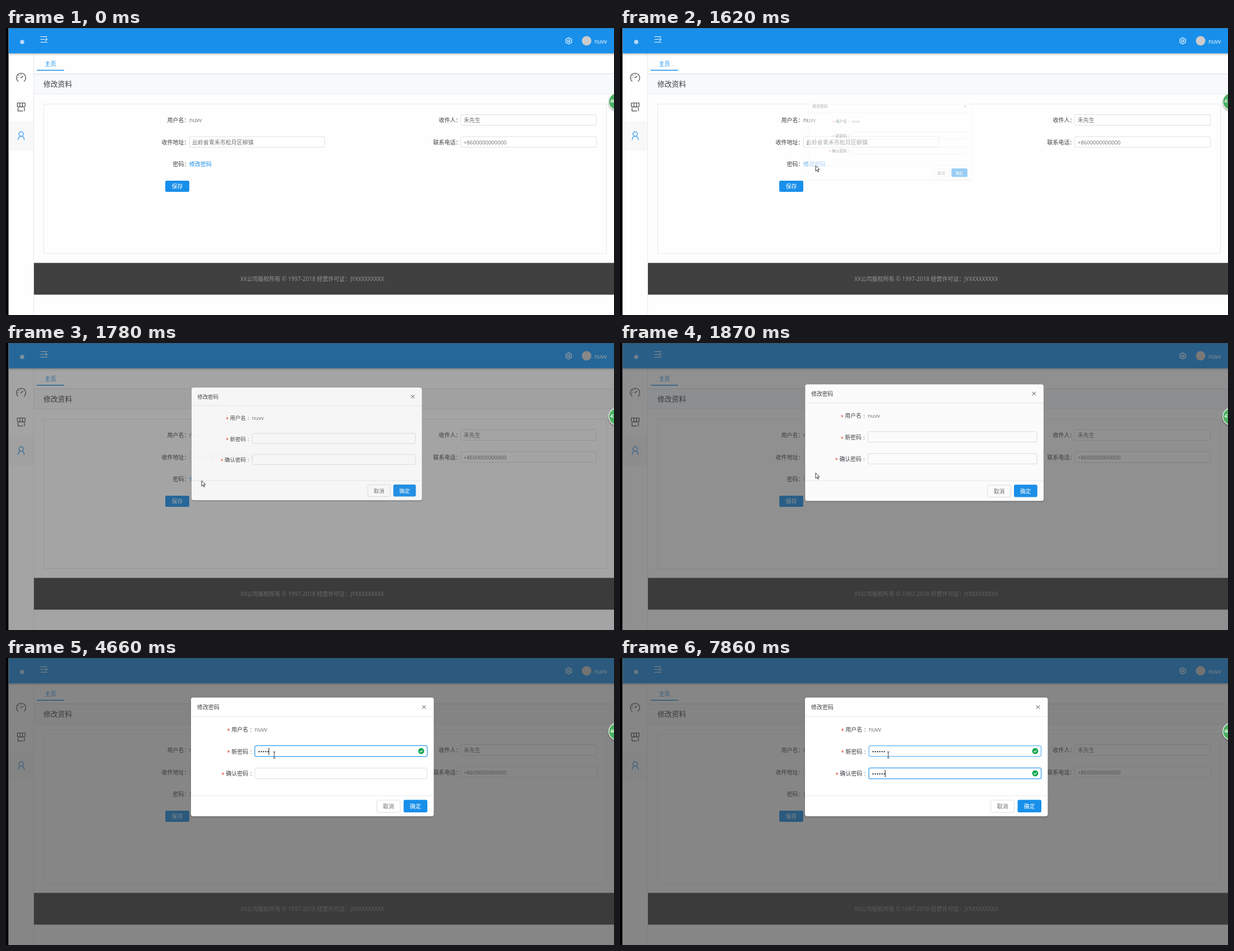
An HTML page for the animation above (8000 ms loop, 1088x515 px).

```html
<!DOCTYPE html>
<html lang="zh-CN">
<head>
<meta charset="utf-8">
<title>修改资料</title>
<style>
html, body { margin: 0; width: 100%; height: 100%; overflow: hidden; background: #fefefe; }
svg { display: block; width: 100%; height: 100%; }
text { font: 10px 'Open Sans', 'Noto Sans CJK SC', 'Noto Sans CJK', sans-serif; fill: #3c3f44; white-space: pre; }
.value { fill: #6c6c6c; }
.phone { font-size: 9.6px; fill: #6c6c6c; }
.title { font-size: 12.8px; }
.link { fill: #188fea; }
.white { fill: #fff; }
.mid { text-anchor: middle; }
.star { fill: #e0402a; }
.footer { fill: #999; text-anchor: middle; }
.count { font: bold 8.5px 'Liberation Sans', sans-serif; fill: #fff; }
.icon { fill: none; stroke: #444; stroke-width: 1.2; stroke-linecap: round; stroke-linejoin: round; }
.blue { stroke: #188fea; }
.pale { stroke: #fff; }
.box { fill: #fff; stroke: #dcdee2; }
.line { stroke: #e6e9ec; }
</style>
</head>
<body>
<svg id="stage" viewBox="0 0 1088 515"></svg>
<script>
const stage = document.getElementById('stage');
const USER = 'nuvv';
const BLUE = '#188fea';

// Text is placed by its left edge (or middle) and its vertical centre.
const text = (x, y, str, cls = '', id = '') =>
  `<text x="${x}" y="${y + 3.8}" class="${cls}" id="${id}">${str}</text>`;
const rect = (x, y, w, h, fill, rx = 0) =>
  `<rect x="${x}" y="${y}" width="${w}" height="${h}" rx="${rx}" fill="${fill}"/>`;
const box = (x, y, w, h, rx = 2.5) =>
  `<rect class="box" x="${x}" y="${y}" width="${w}" height="${h}" rx="${rx}"/>`;
const icon = (d, cls = '') => `<path class="icon ${cls}" d="${d}"/>`;
const line = (x1, x2, y) => `<path class="line" d="M${x1} ${y}H${x2}"/>`;

const label = (x, y, str) =>
  text(x - 8, y + 1.5, '*', 'star') + text(x, y, str) + text(437, y, ':');

const passwordField = (id, y) => `
  <rect id="${id}Glow" x="444" y="${y - 11}" width="311" height="22" rx="3.5" fill="${BLUE}"/>
  ${box(445.5, y - 9.5, 308, 19)}
  <rect id="${id}Edge" x="445.5" y="${y - 9.5}" width="308" height="19" rx="2.5" fill="none" stroke="#3fa3ee"/>
  <g id="${id}Dots">${[...Array(6).keys()].map(i =>
    `<circle cx="${452.8 + 4 * i}" cy="${y + 1}" r="1.25" fill="#444"/>`).join('')}</g>
  <path id="${id}Caret" d="M0 ${y - 6}v13" stroke="#222"/>
  <g id="${id}Check">
    <circle cx="743" cy="${y}" r="5.4" fill="#08a650"/>
    <path d="M740.5 ${y}l1.9 1.9 3.3-3.4" fill="none" stroke="#fff" stroke-width="1.2"/>
  </g>`;

const page = `
  <defs><linearGradient id="shade" x2="0" y2="1">
    <stop stop-color="#000" stop-opacity=".22"/><stop offset="1" stop-color="#000" stop-opacity="0"/>
  </linearGradient></defs>
  ${rect(0, 0, 1088, 515, '#fefefe')}
  ${rect(5, 167, 45, 53, '#f8f8f9')}
  <path class="line" d="M49.5 46V515"/>
  ${rect(50, 83, 1038, 35, '#f8f9fb')}
  <path d="M50 82.5H1088" stroke="#d6dee5"/>
  ${line(50, 1088, 118.5)}
  ${rect(5, 45, 1083, 5, 'url(#shade)')}
  ${rect(5, 0, 1083, 45.5, BLUE)}
  ${rect(5, 0, 1083, 1, '#3a78ac')}
  <circle cx="29" cy="25" r="3.8" fill="#b5d9f7"/>
  ${icon('M62 15.5h11.5M62 20.5h8M62 25.5h11.5M71 18.3l2.6 2.2-2.6 2.2', 'pale')}
  ${icon('M1007 17.3l5 2.9v5.7l-5 2.9-5-2.9v-5.7z', 'pale')}
  <circle class="icon pale" cx="1007" cy="23" r="2"/>
  <circle cx="1039" cy="23" r="8.5" fill="#cbcbcb"/>
  ${text(1053, 24, USER, 'white')}
  ${icon('M21.5 95.5A8.3 8.3 0 1 1 32.5 95.5M26.5 89.5l4-3M21 89h1M27 82.5v1M23 85l.5.5')}
  ${icon('M20.3 134.5h13.8v5a2.3 2.3 0 0 1-4.6 0 2.3 2.3 0 0 1-4.6 0 2.3 2.3 0 0 1-4.6 0zM24.9 134.5v5M29.5 134.5v5M21.5 143.5v5.3h8.5M33 143.5v5.3')}
  ${icon('M31.2 190.2a4 4 0 1 1-8 0 4 4 0 1 1 8 0M21.8 200.3c.3-4 2.4-6.1 5.4-6.1s5.1 2.1 5.4 6.1', 'blue')}
  ${text(69.5, 64.5, '主页', 'link')}
  ${rect(55, 75, 49, 1.5, BLUE)}
  ${text(67, 101.5, '修改资料', 'title')}
  <rect x="67.5" y="136.5" width="1007" height="268" fill="none" class="line"/>
  ${text(288.5, 165.5, '用户名：')}${text(328, 165.5, USER, 'value')}
  ${text(278.5, 205, '收件地址：')}${box(328.5, 195, 242, 19)}
  ${text(333, 205, '云岭省青禾市松月区柳镇', 'value')}
  ${text(298.5, 244.5, '密码：')}${text(328, 244.5, '修改密码', 'link', 'link')}
  ${text(774.5, 165.5, '收件人：')}${box(813.5, 155.5, 243, 19)}
  ${text(819, 165.5, '禾先生', 'value')}
  ${text(764.5, 205, '联系电话：')}${box(813.5, 195, 243, 19)}
  ${text(819, 205, '+8600000000000', 'phone')}
  ${rect(285, 274, 43, 20, BLUE, 2.5)}${text(306.5, 284.3, '保存', 'white mid')}
  ${rect(50, 421.5, 1038, 57, '#404040')}
  ${text(548, 450, 'XX公司版权所有 © 1997-2018 经营许可证：JYXXXXXXXXX', 'footer')}`;

const modal = `
  <rect id="mask" x="4.5" y="0" width="1084" height="515" fill="#373737"/>
  <g id="modal">
    ${rect(330, 72, 436.5, 214.5, 'rgba(0,0,0,.12)', 5)}
    ${rect(331, 71, 434.5, 213, '#fff', 4)}
    ${line(331, 765.5, 105)}${line(331, 765.5, 247)}
    ${text(342, 88, '修改密码')}
    <path d="M744.8 84.8l6.4 6.4m0-6.4l-6.4 6.4" stroke="#777" stroke-width="1.1"/>
    ${label(403.5, 128.5, '用户名')}${text(445, 128.5, USER, 'value')}
    ${label(403.5, 168, '新密码')}${passwordField('first', 167)}
    ${label(393.5, 207.5, '确认密码')}${passwordField('second', 207)}
    ${box(663.5, 255, 42, 22)}${text(684.5, 266.3, '取消', 'value mid')}
    ${rect(711.5, 254.5, 42.5, 22.5, BLUE, 2.5)}${text(732.7, 266.3, '确定', 'white mid')}
  </g>`;

const overlay = `
  ${rect(0, 0, 4.5, 515, '#000')}
  <circle cx="1094" cy="134" r="17" fill="#000" opacity=".18"/>
  <circle cx="1094" cy="132" r="16" fill="#e9eeea"/>
  <circle cx="1094" cy="132" r="14.6" fill="#4bb062"/>
  <text id="count" class="count" x="1081.5" y="134.3"></text>
  <path id="arrow" d="M0 0v9.8l2.3-2.1 1.6 3.6 1.6-.7-1.6-3.5h3.1z" fill="#fff" stroke="#222" stroke-width=".9"/>
  <path id="beam" d="M-2-5.5h1.4l.6.6.6-.6H2M0-5V5M-2 5.5h1.4l.6-.6.6.6H2" fill="none" stroke="#333"/>`;

stage.innerHTML = page + modal + overlay;
const el = id => document.getElementById(id);
const show = (id, opacity) => el(id).setAttribute('opacity', +opacity);
const clamp = v => Math.max(0, Math.min(1, v));
const ramp = (t, from, to) => clamp((t - from) / (to - from));

// The screen refreshes only at these moments.
const TICKS = [0, 150, 230, 300, 380, 460, 530, 610, 690, 770, 840, 920, 990, 1080, 1170, 1270,
  1530, 1620, 1710, 1780, 1870, 1950, 2030, 2110, 2180, 2250, 2320, 2410, 2480, 2560, 2640, 2790,
  3010, 3240, 3470, 3550, 3630, 3720, 3810, 4030, 4430, 4660, 4890, 5270, 5430, 5750, 5820, 5890,
  5970, 6130, 6210, 6290, 6380, 6460, 6680, 6910, 7300, 7540, 7620, 7700, 7780, 7860];
const POINTER = [[150, 430, 506], [460, 378, 345], [920, 354, 256], [1270, 350, 247], [1780, 350, 247],
  [1870, 350, 233], [2110, 420, 195], [2320, 474, 171], [2640, 480, 174]];
const FIRST_KEYS = [3470, 3720, 4030, 4430, 4660, 4890];
const SECOND_KEYS = [6130, 6380, 6680, 6910, 7300, 7540];

function pointerAt(t) {
  const next = POINTER.findIndex(p => p[0] > t);
  if (next < 0) return POINTER.at(-1).slice(1);
  if (next === 0) return POINTER[0].slice(1);
  const [a, b] = [POINTER[next - 1], POINTER[next]];
  const k = ramp(t, a[0], b[0]);
  return [a[1] + (b[1] - a[1]) * k, a[2] + (b[2] - a[2]) * k];
}

function drawField(id, t, keys, focus, touched, caret) {
  const typed = keys.filter(k => t >= k).length;
  show(id + 'Glow', 0.3 * focus);
  show(id + 'Edge', Math.max(focus, touched));
  [...el(id + 'Dots').children].forEach((dot, i) => dot.setAttribute('opacity', +(i < typed)));
  show(id + 'Check', ramp(t, keys[0], keys[0] + 250));
  show(id + 'Caret', caret);
  el(id + 'Caret').setAttribute('transform', `translate(${450.5 + 4 * typed})`);
}

function draw(time) {
  const t = TICKS.findLast(tick => tick <= time);

  el('link').style.fill = t >= 1530 ? '#6fb3f0' : t >= 1170 ? '#57a8ee' : BLUE;
  el('count').textContent = t < 530 ? 46 : t < 3240 || (t >= 5270 && t < 6290) ? 47 : 48;

  // The dialog grows out of the clicked point while the mask darkens.
  const rest = Math.exp((1710 - t) / 86);
  const open = t >= 1620;
  const scale = 1 - 0.115 * rest;
  show('mask', open ? clamp(0.6 - 0.34 * rest) : 0);
  show('modal', open ? clamp(1 - 0.2 * rest) : 0);
  el('modal').setAttribute('transform', open ? `translate(350 247) scale(${scale}) translate(-350 -247)` : '');

  const leave = ramp(t, 5690, 5890);
  drawField('first', t, FIRST_KEYS, ramp(t, 2410, 2640) * (1 - leave), leave,
    (t >= 2480 && t < 3010) || (t >= 3470 && t < 5430));
  drawField('second', t, SECOND_KEYS, leave, 0, t >= 5750);

  const [x, y] = pointerAt(t);
  const inField = t >= 2250;
  show('arrow', t >= 150 && !inField);
  show('beam', inField);
  for (const id of ['arrow', 'beam']) el(id).setAttribute('transform', `translate(${x} ${y})`);
}

const start = performance.now();
(function loop() {
  draw((performance.now() - start) % 8000);
  requestAnimationFrame(loop);
})();
</script>
</body>
</html>
```
